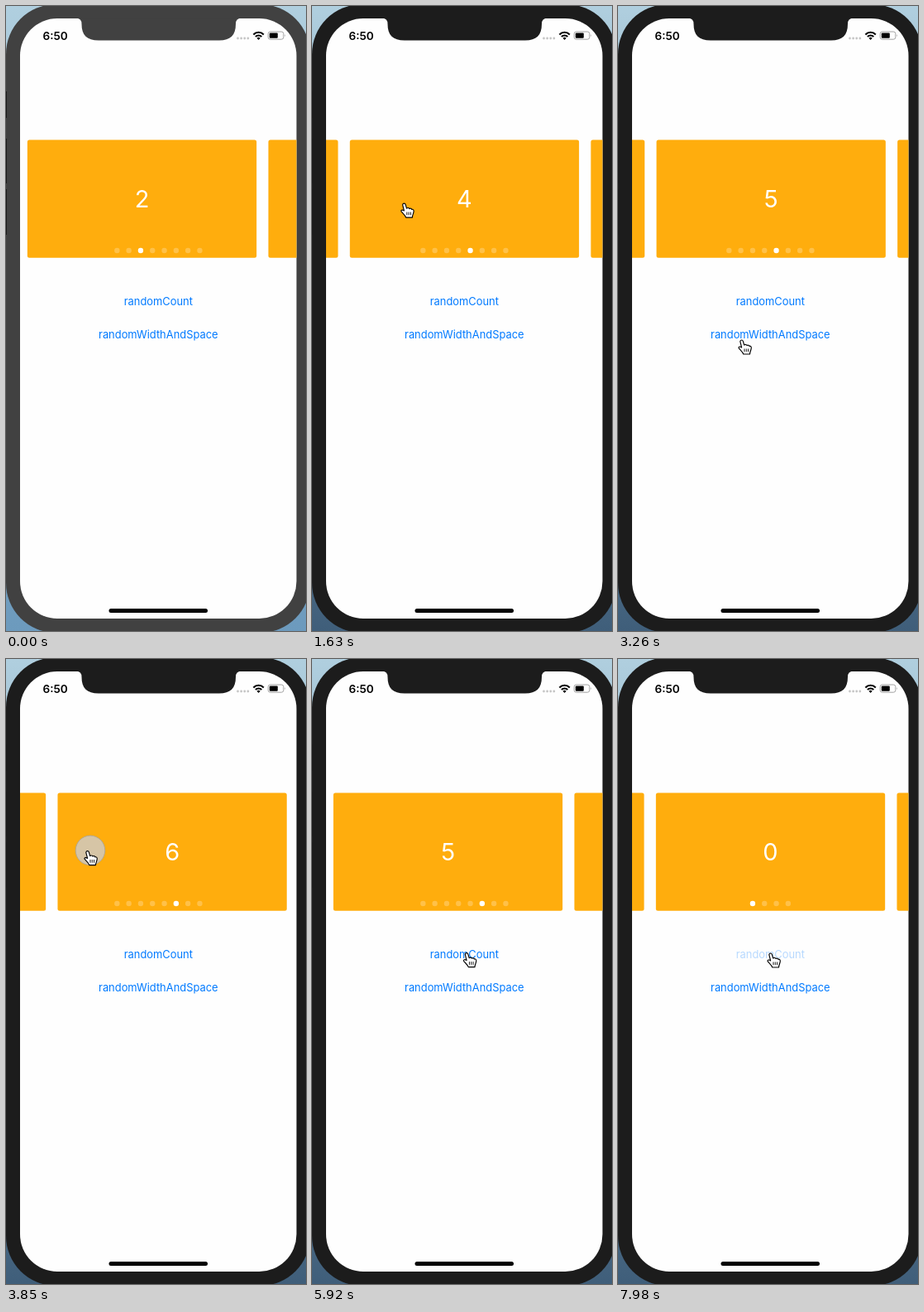
An HTML page that plays this animation: 363x754 px, repeating every 8 s.

```html
<!DOCTYPE html>
<html lang="en">
<head>
<meta charset="utf-8">
<title>Card carousel</title>
<style>
  html, body { margin: 0; width: 100%; height: 100%; overflow: hidden; }
  svg { display: block; font-family: Inter, Roboto, sans-serif; }
  .link { font-size: 12.9px; fill: #007aff; text-anchor: middle; }
  .num { font-size: 29px; fill: #fff; text-anchor: middle; }
</style>
</head>
<body>
<svg width="363" height="754" viewBox="0 0 363 754">
  <defs>
    <linearGradient id="sky" x1="0" y1="0" x2="0" y2="1">
      <stop offset="0" stop-color="#b0cfdf"/>
      <stop id="ground" offset="1"/>
    </linearGradient>
    <clipPath id="view"><rect x="17" y="150" width="334.5" height="170"/></clipPath>
  </defs>
  <rect width="363" height="754" fill="url(#sky)"/>
  <g id="body">
    <rect y="-2" width="368" height="758" rx="60"/>
    <rect x="17" y="15" width="334.5" height="724" rx="45" fill="#fefefe"/>
    <path d="M85 14.5Q91.5 15 91.5 21.5C91.5 35.5 98 41.5 112 41.5H258C271.500 41.5 278 35.500 278 21.500Q278 15 284.500 14.500Z"/>
  </g>
  <path d="M.5 103v32M.5 160v54M.5 221v55" stroke="#181818"/>

  <!-- status bar -->
  <text x="44.5" y="40.5" font-size="13.6" font-weight="600">6:50</text>
  <path d="M280.5 39h.01m4.1 0h.01m4.1 0h.01m4.1 0h.01" stroke="#c6c6c6" stroke-width="2.8" stroke-linecap="round"/>
  <path d="M299.4 34.4a8.7 8.7 0 0 1 12.4 0M301.9 37a5.2 5.2 0 0 1 7.4 0" fill="none" stroke="#000" stroke-width="2.1"/>
  <path d="M303.5 38.7a3 3 0 0 1 4.2 0L305.6 41Z"/>
  <rect x="317.2" y="31" width="18.6" height="9.2" rx="2.5" fill="none" stroke="#a3a3a3"/>
  <rect x="318.8" y="32.5" width="10" height="6.2" rx="1"/>
  <path d="M337 34q1.6 1.6 0 3.2z" fill="#a3a3a3"/>

  <g id="cards" clip-path="url(#view)"></g>
  <g id="dots" fill="#fff"></g>
  <text id="count" class="link" x="184.3" y="361.4">randomCount</text>
  <text class="link" x="184.3" y="400.8">randomWidthAndSpace</text>
  <rect x="124.5" y="727" width="119.5" height="5" rx="2.5"/>

  <g id="pointer">
    <circle id="touch" cx="3" cy="-.7" r="17.8" fill="#ccc" fill-opacity=".8" stroke="#a5a19a" stroke-width=".8"/>
    <path d="M-2.2 1.7C-1.7-.5.8-.4 1.3 1.3L2.7 6C4 5 5.6 5.4 6 6.5C7.2 5.7 8.5 6.2 8.9 7.4C10 6.8 11.3 7.7 11.3 9.2C11.3 12 9.7 13.5 9.5 17H1.8C1 14.5-1.5 12.5-3.8 9.9C-4.5 8.4-3 7.5-1.5 8.3L-.4 8.9Z" fill="#fff" stroke="#000" stroke-width="1.15" stroke-linejoin="round"/>
    <path d="M3 10.500v3.700m2.300-3.700v3.700m2.300-3.700v3.700" stroke="#000" stroke-width=".9"/>
  </g>
</svg>
<script>
const $ = id => document.getElementById(id);
const LOOP = 8000, TICK = 147.7, STEP = 148;   // the screen refreshes in coarse ticks
const PITCH = 291.6, WIDTH = 277.3, LEFT = 45.8, MID = 184.4, SLIDE = 540;

// Times in ms
const turns = [{at: -49, by: 1}, {at: 1000, by: 1}, {at: 2800, by: 1},
  {at: 3500, by: 1}, {at: 4312, by: -1}, {at: 5871, by: 1}];
const decks = [{at: -1e4, count: 8}, {at: 6800, count: 6}, {at: 7530, count: 4}];
const drags = [[880, 1340], [3500, 3900], [4280, 4500]];
const taps = [[6500, 6670], [7390, 7410], [7830, 7870]];

// Fingertip stops: [time, x, y]
const stops = [[888, 279, 214], [1400, 85, 226], [2220, 227, 290], [3108, 152, 350], [3256, 150, 403],
  [3552, 270, 225], [3900, 88, 232], [4290, 125, 255], [4588, 267, 262], [5030, 240, 444],
  [5476, 192, 354], [6216, 185, 355]];

const clamp = t => Math.min(1, Math.max(0, t));
const glide = t => 1 - (1 - clamp(t)) ** 4 * (1 + 4 * clamp(t));
const within = (spans, ms, linger = 0) => spans.some(([from, to]) => ms >= from && ms < to + linger);

function fingertip(ms) {
  const next = stops.findIndex(s => s[0] >= ms);
  if (next < 1) return stops[next < 0 ? stops.length - 1 : 0].slice(1);
  const a = stops[next - 1], b = stops[next];
  const t = (ms - a[0]) / (b[0] - a[0]), k = t * t * (3 - 2 * t);
  return [1, 2].map(i => a[i] + (b[i] - a[i]) * k);
}

function carousel(ms) {
  const deck = decks.filter(d => d.at <= ms).pop();
  if (deck !== decks[0]) {
    return {count: deck.count, active: 0, page: .12 * (glide((ms - deck.at) / SLIDE) - 1)};
  }
  // The lit dot follows only once a slide has come to rest.
  let page = 2, active = 2;
  for (const {at, by} of turns) {
    page += by * glide((ms - at) / SLIDE);
    if (ms >= at + SLIDE) active += by;
  }
  return {count: deck.count, active, page};
}

function draw(ms) {
  const {count, active, page} = carousel(ms);
  let cards = '', dots = '';
  const near = Math.round(page);
  for (let i = near - 1; i <= near + 1; i++) {
    const x = LEFT + (i - page) * PITCH;
    cards += `<rect x="${x}" y="161.5" width="${WIDTH}" height="142.2" rx="2.5" fill="#ffad0d"/>
      <text class="num" x="${x + WIDTH / 2}" y="243">${(i + count) % count}</text>`;
  }
  for (let i = 0; i < count; i++) {
    dots += `<circle cx="${MID + (i - (count - 1) / 2) * 14.3}" cy="295" r="3.2" opacity="${i === active ? 1 : .25}"/>`;
  }
  $('cards').innerHTML = cards;
  $('dots').innerHTML = dots;

  const focused = ms >= stops[0][0];
  $('body').setAttribute('fill', focused ? '#1c1c1c' : '#414141');
  $('ground').setAttribute('stop-color', focused ? '#3f5e7a' : '#6c9abd');
  $('count').setAttribute('opacity', within(taps, ms, 130) ? .28 : 1);
  $('touch').style.display = within([...drags, ...taps], ms) ? '' : 'none';
  $('pointer').style.display = focused ? '' : 'none';
  $('pointer').setAttribute('transform', `translate(${fingertip(ms)})`);
}

let shown = -1;
const begin = performance.now();
function frame() {
  const tick = Math.floor((performance.now() - begin) % LOOP / TICK);
  if (tick !== shown) draw((shown = tick) * STEP);
  requestAnimationFrame(frame);
}
frame();
</script>
</body>
</html>
```
